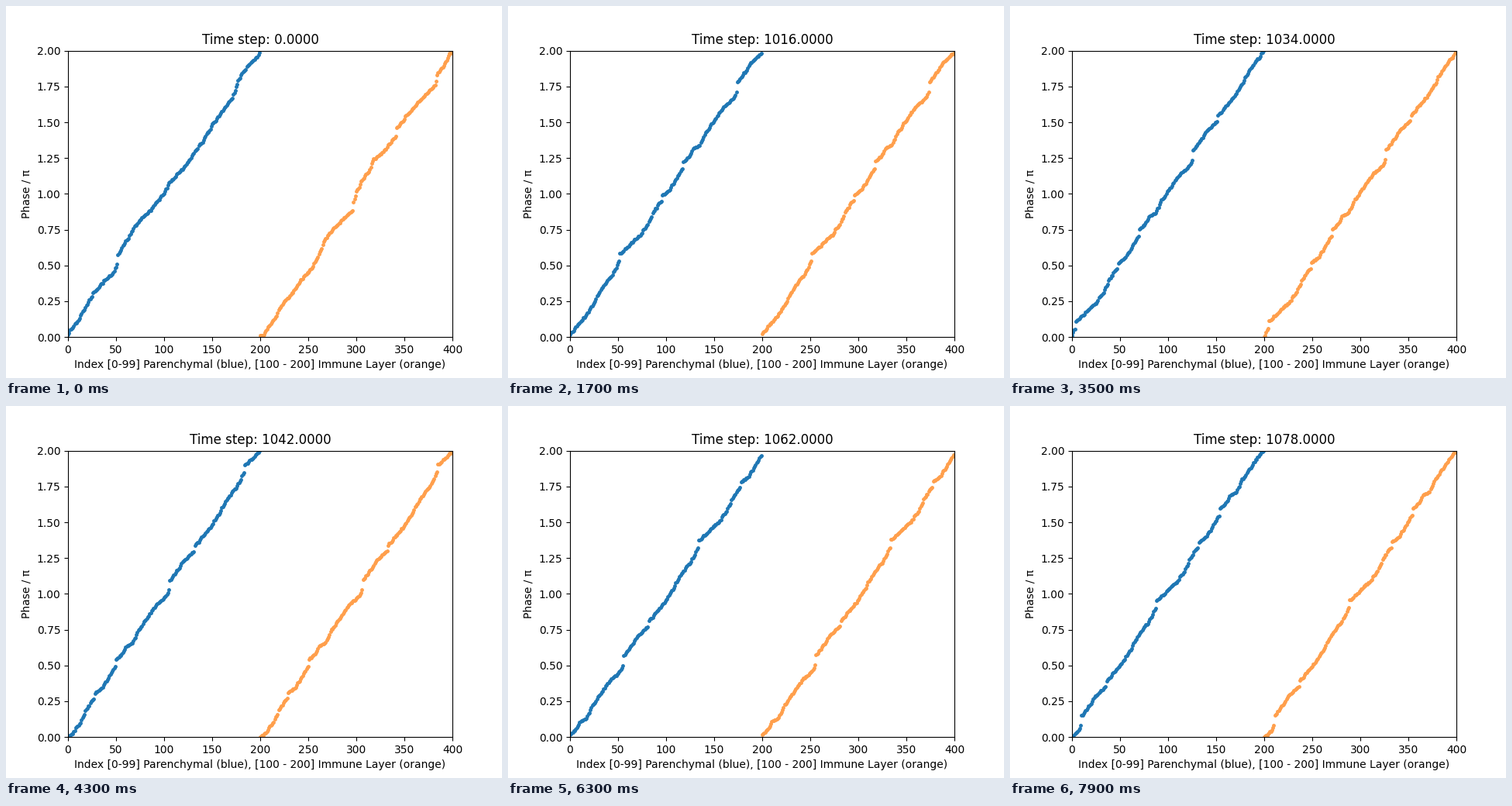
Animation of 640x480 px, one loop 8000 ms. Source, as a matplotlib script:

```python
import matplotlib.pyplot as plt
import numpy as np
from matplotlib.animation import FuncAnimation

FRAMES, INTERVAL = 80, 100
COUNT = 200            # oscillators per layer
DRIFT = 0.02628        # phase lost per step, in units of pi
REF_STEP = 1016        # step at which the locked profile is described
LEAD = 0.003           # small phase lead of the immune layer

rng = np.random.default_rng(4)
index = np.arange(COUNT)


def profile(*keys):
    """Sorted phases through (index, phase / pi) keys with uneven gaps between."""
    phase = np.empty(COUNT)
    for (i0, p0), (i1, p1) in zip(keys, keys[1:]):
        gaps = rng.gamma(5, size=i1 - i0)
        phase[i0] = p0
        phase[i0 + 1:i1 + 1] = p0 + (p1 - p0) * gaps.cumsum() / gaps.sum()
    return phase


# Keys mark only the widest gaps and bends of each profile
blue_start = profile(
    (0, .02), (26, .31), (46, .44), (51, .51), (52, .575), (71, .78),
    (95, .96), (107, 1.09), (140, 1.36), (171, 1.67), (181, 1.84),
    (199, 1.985))
orange_start = profile(
    (0, .01), (4, .015), (19, .19), (25, .25), (55, .495), (70, .71),
    (96, .885), (100, 1.02), (117, 1.23), (141, 1.40), (142, 1.46),
    (163, 1.63), (182, 1.76), (184, 1.83), (199, 1.99))
locked = profile(
    (0, .02), (28, .287), (47, .471), (51, .53), (52, .585), (74, .72),
    (88, .885), (95, .95), (96, .99), (104, 1.03), (117, 1.175),
    (118, 1.225), (129, 1.32), (135, 1.34), (156, 1.57), (173, 1.71),
    (174, 1.78), (188, 1.915), (199, 1.98))


def rotated(step, lead=0.0):
    return np.sort((locked + lead - DRIFT * (step - REF_STEP)) % 2)


fig, ax = plt.subplots(figsize=(6.4, 4.8), dpi=100)
ax.set(xlim=(0, 400), ylim=(0, 2), ylabel="Phase / π",
       xlabel="Index [0-99] Parenchymal (blue), "
              "[100 - 200] Immune Layer (orange)")
title = ax.set_title("")
dots = dict(ls="", marker="o", ms=2.5, mew=1.0)
blue, = ax.plot([], [], color="#1f77b4", **dots)
orange, = ax.plot([], [], color="#ff9f4c", **dots)


def update(i):
    # The loop opens on the initial state, then skips to the locked one
    if i == 0:
        step, low, high = 0, blue_start, orange_start
    else:
        step = 999 + i
        low, high = rotated(step), rotated(step, LEAD)
    blue.set_data(index, low)
    orange.set_data(index + COUNT, high)
    title.set_text(f"Time step: {step:.4f}")
    return blue, orange, title


anim = FuncAnimation(fig, update, frames=FRAMES, interval=INTERVAL,
                     repeat=True, repeat_delay=0, blit=False)
plt.show()
```
